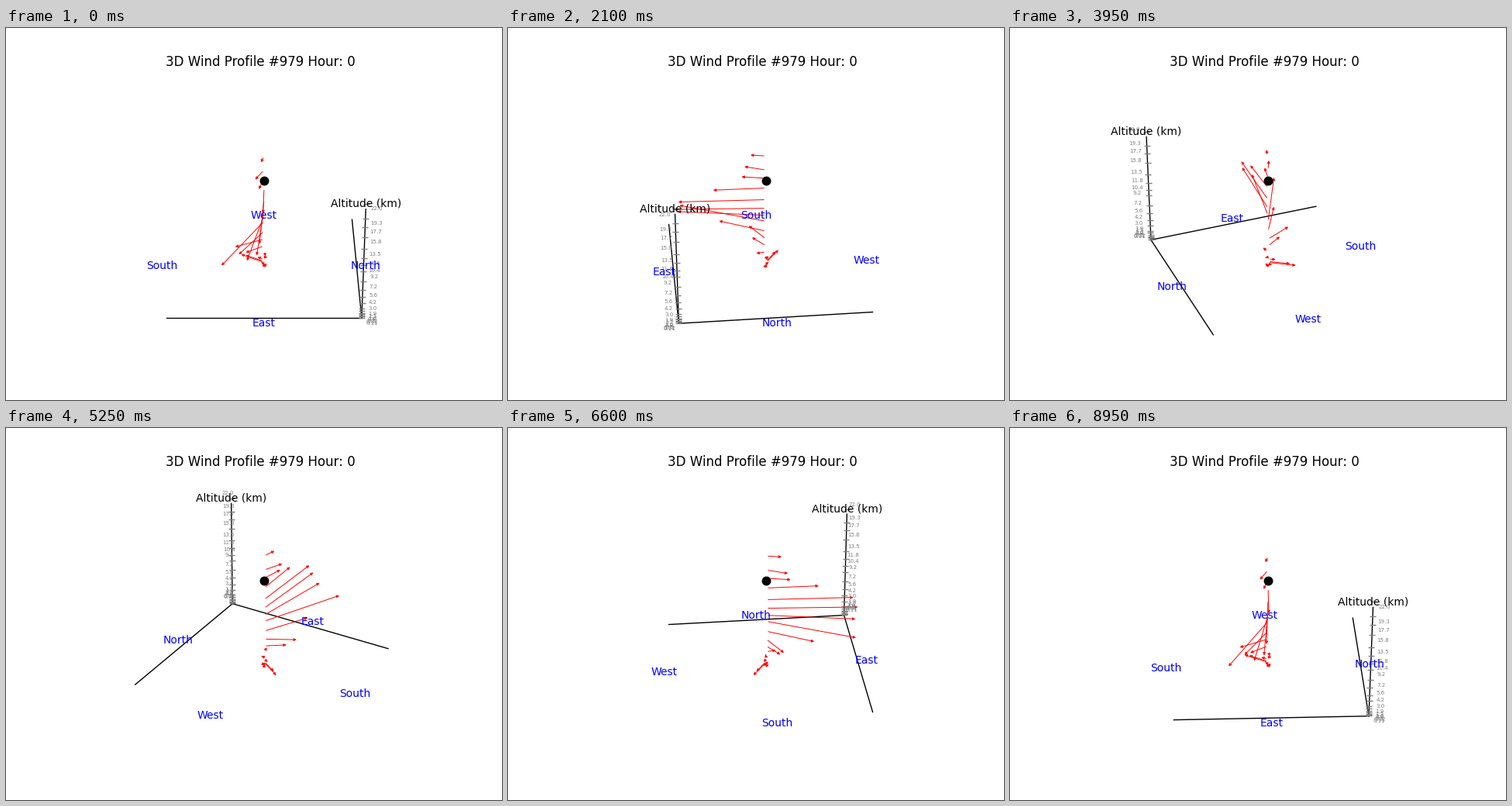
Animation, 640 px wide and 480 px high, one loop 9 s. Source, as a matplotlib script:

```python
import numpy as np
import matplotlib.pyplot as plt
from matplotlib.animation import FuncAnimation
from matplotlib.patches import FancyArrowPatch

W, H = 640, 480
FRAMES, INTERVAL = 180, 50
CX, CY, SCALE, DIST = 333.0, 237.4, 1997.8, 10.0
SIN_E, COS_E = 0.5, np.sqrt(0.75)      # camera elevation of 30 degrees
EDGE, RIM = 0.61, 0.671                # axis corner and label distance
TOP = 21.0                             # upper end of the altitude axis in km

# pressure-level heights in km
LEVELS = [0.11, 0.32, 0.5, 0.8, 1.0, 1.5, 1.9, 3.0, 4.2, 5.6, 7.2, 9.2,
          10.4, 11.8, 13.5, 15.8, 17.7, 19.3, 22.0]
COMPASS = {"North": (0, RIM), "South": (0, -RIM), "East": (RIM, 0), "West": (-RIM, 0)}


def profile(*knots):
    """Values at all levels, linear between (altitude, value) knots."""
    return np.interp(LEVELS, *zip(*knots))


# a westerly jet near 12 km over a shallow north-easterly surface flow
east = profile((0.1, 0.02), (0.5, -0.02), (0.8, -0.11), (1.5, -0.03), (3, 0.08),
               (5.6, 0.105), (9.2, 0.56), (11.8, 0.605), (13.5, 0.577),
               (17.7, 0.167), (22, 0.11))
north = profile((0.1, 0.01), (0.5, -0.02), (0.8, -0.166), (1.5, -0.057),
                (1.9, 0.036), (3, 0.016), (4.2, -0.132), (5.6, -0.2),
                (7.2, -0.17), (9.2, -0.272), (10.4, -0.11), (11.8, -0.047),
                (15.8, -0.007), (19.3, -0.065), (22, -0.026))


def project(x, y, alt, azim):
    """Perspective view of a scene point, in pixels from the top left."""
    z = (alt - 11.055) * 0.03737
    c, s = np.cos(azim), np.sin(azim)
    toward = c * x + s * y
    k = SCALE / (DIST - COS_E * toward - SIN_E * z)
    return CX + k * (c * y - s * x), CY + k * (SIN_E * toward - COS_E * z)


fig = plt.figure(figsize=(W / 100, H / 100), dpi=100, facecolor="white")
ax = fig.add_axes([0, 0, 1, 1])
ax.set_xlim(0, W)
ax.set_ylim(H, 0)
ax.axis("off")


def label(text, size, color):
    return ax.text(0, 0, text, fontsize=size, color=color, ha="center",
                   va="center", zorder=6)


def make_arrow():
    return ax.add_patch(FancyArrowPatch((0, 0), (1, 1), arrowstyle="-|>",
                                        mutation_scale=5, lw=0.7, color="red",
                                        zorder=4))


ax.text(328, 49.3, "3D Wind Profile #979 Hour: 0", fontsize=12, ha="center")
ax.plot(*project(0, 0, 17.3, 0), "o", color="black", ms=7.07, mew=1.5, zorder=5)

ends = [(-EDGE, EDGE, 0), (EDGE, -EDGE, 0), (EDGE, EDGE, TOP)]
axis_lines = [ax.plot([], [], color="black", lw=1, zorder=2)[0] for _ in ends]
ticks, = ax.plot([], [], "_", color="gray", ms=6, mew=1, zorder=3)
tick_texts = [label(str(alt), 5, "gray") for alt in LEVELS]
compass_texts = [label(name, 10, "blue") for name in COMPASS]
axis_title = label("Altitude (km)", 10, "black")
arrows = [make_arrow() for _ in LEVELS]


def update(frame):
    azim = 2 * np.pi * frame / FRAMES
    corner = project(EDGE, EDGE, 0, azim)
    for line, end in zip(axis_lines, ends):
        line.set_data(*zip(corner, project(*end, azim)))
    ticks.set_data(*project(EDGE, EDGE, np.array(LEVELS), azim))
    for alt, u, v, arrow, text in zip(LEVELS, east, north, arrows, tick_texts):
        arrow.set_positions(project(0, 0, alt, azim), project(u, v, alt, azim))
        text.set_position(project(RIM, RIM, alt, azim))
    for text, (x, y) in zip(compass_texts, COMPASS.values()):
        text.set_position(project(x, y, 0, azim))
    axis_title.set_position(project(EDGE, EDGE, LEVELS[-1], azim))
    return [*axis_lines, ticks, *arrows, *tick_texts, *compass_texts, axis_title]


anim = FuncAnimation(fig, update, frames=FRAMES, interval=INTERVAL,
                     repeat=True, repeat_delay=0)
plt.show()
```
